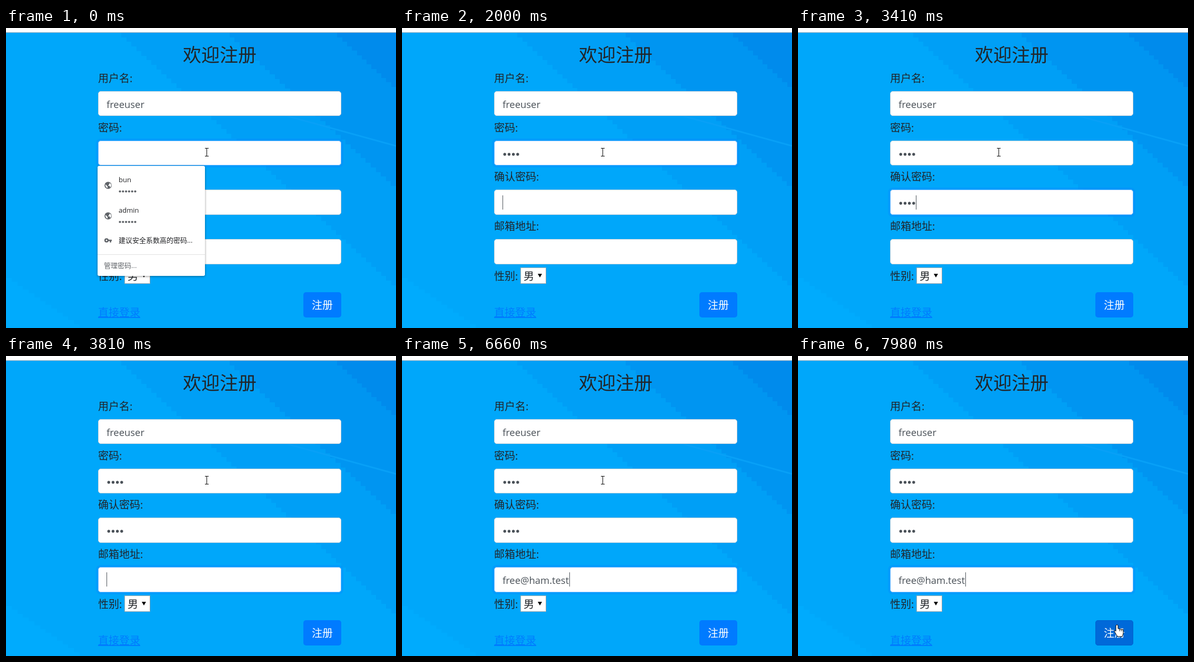
These frames come from a looping animation (741x570 px, 8 s). An HTML page:

```html
<!DOCTYPE html>
<html lang="zh-CN">
<head>
<meta charset="utf-8">
<title>注册</title>
<style>
  html, body { margin: 0; width: 100%; height: 100%; overflow: hidden; background: #fff; }
  svg { display: block; width: 741px; height: 570px; }
  text { font: 20px "Open Sans", "Noto Sans CJK SC", "Noto Sans CJK", sans-serif; fill: #212529; }
  .title { font-size: 35px; }
  .value { font-size: 18.4px; fill: #495057; }
  .small { font-size: 13px; fill: #202124; }
  .gray { fill: #5f6368; }
  .dot { fill: #495057; }
  .field { fill: #fff; stroke: #ced4da; }
  .glow { stroke: #007bff; stroke-opacity: .25; stroke-width: 4; }
  .link { fill: #007bff; text-decoration: underline; }
  .white { fill: #fff; }
  #popup { filter: drop-shadow(0 1px 2px rgba(0, 0, 0, .4)); }
</style>
</head>
<body>
<svg viewBox="0 0 741 570">
  <rect y="9" width="741" height="561" fill="#00a7fa"/>
  <g id="sky" shape-rendering="crispEdges"></g>
  <path d="M530 166L741 224" stroke="#08a0f7" stroke-width="3"/>
  <path d="M0 8.500H741" stroke="#a9b4bd"/>

  <text class="title" x="336" y="64">欢迎注册</text>
  <g id="form"></g>
  <rect id="caret" width="1" height="27" fill="#495057"/>

  <text x="175" y="479">性别:</text>
  <rect x="225.5" y="455.5" width="48" height="30" fill="#fff" stroke="#a9a9a9"/>
  <text x="231" y="479">男</text>
  <path d="M258 467H266L262 474Z"/>
  <text class="link" x="175" y="548">直接登录</text>
  <rect x="565" y="502" width="72" height="48" rx="5" fill="#007bff"/>
  <rect id="hover" x="565.5" y="502.5" width="71" height="47" rx="4.5" fill="#0069d9" stroke="#0062cc"/>
  <text class="white" x="581" y="534">注册</text>

  <g id="popup">
    <rect class="white" x="174" y="262" width="204" height="209" rx="3"/>
    <g id="saved"></g>
    <g fill="none" stroke="#5f6368" stroke-width="2.6">
      <circle cx="191" cy="403.500" r="2.8"/>
      <path d="M194 403.500H201M198.500 403.500V407.500"/>
    </g>
    <text class="small" x="214" y="408">建议安全系数高的密码...</text>
    <path d="M174 430.500H378" stroke="#e0e0e0"/>
    <text class="small gray" x="186" y="456">管理密码...</text>
  </g>

  <g id="cursor" stroke="#000" fill="#fff" stroke-linejoin="round">
    <path fill="none" d="M-3 -7.500H4M.5 -7.500V7.500M-3 7.500H4"/>
    <path d="M0 0V17L4 13L7 19L9.500 18L7 12H12Z"/>
    <path d="M-2 1Q0 -2 2 1V7L12 9V16L10 22H1L-5 12Q-5 9 -2 12ZM5.500 8V12M9 9V12"/>
  </g>
</svg>
<script>
const $ = id => document.getElementById(id);
const NS = 'http://www.w3.org/2000/svg';
const LOOP = 8000, MAIL = 'free@ham.test', FADE = 150, BLINK = 550;

function add(parent, tag, attrs, text = '') {
  const el = parent.appendChild(document.createElementNS(NS, tag));
  for (const k in attrs) el.setAttribute(k, attrs[k]);
  el.textContent = text;
  return el;
}

// Diagonal edge in small stairs, closed by the corner (cx, cy)
function band(fill, x, y, u, v, cx, cy) {
  const n = Math.round(Math.hypot(u - x, v - y) / 13);
  let d = `M${x} ${y}`;
  for (let k = 1; k <= n; k++)
    d += `H${Math.round(x + (u - x) * k / n)}V${Math.round(y + (v - y) * k / n)}`;
  add($('sky'), 'path', { d: `${d}L${cx} ${cy}Z`, fill });
}
band('#00abfd', 0, 475, 140, 570, 0, 570);
for (let i = 0; i < 3; i++) {
  const x = 210 + 205 * i;
  band(`rgb(0,${159 - 10 * i},${246 - 5 * i})`, x, 9, 741, 9 + (741 - x) * .92, 741, 9);
}

// Form rows share one pitch
const rowY = (i, offset) => Math.round(120 + 93.7 * i + offset);
const rows = ['用户名:', '密码:', '确认密码:', '邮箱地址:'].map((label, i) => {
  const top = rowY(i, 0), bottom = rowY(i, 47.45), form = $('form');
  const box = { x: 175.5, y: top + .5, width: 461, height: bottom - top - 1, rx: 4.5 };
  add(form, 'text', { x: 175, y: top - 17 }, label);
  add(form, 'rect', { class: 'field', ...box });
  const glow = add(form, 'g', { fill: 'none' });
  add(glow, 'rect', { class: 'glow', x: 173, y: top - 2, width: 466, height: bottom - top + 4, rx: 7 });
  add(glow, 'rect', { stroke: '#80bdff', ...box });
  const value = add(form, 'text', { class: 'value', x: 191, y: rowY(i, 32) });
  return { top, bottom, glow, value };
});
rows[0].value.textContent = 'freeuser';
const mail = rows[3].value;

function dots(parent, count, x, y, gap, r, cls) {
  return Array.from({ length: count }, (_, i) =>
    add(parent, 'circle', { class: cls, cx: x + gap * i, cy: y, r }));
}
const secrets = [1, 2].map(i => dots($('form'), 4, 195.2, rowY(i, 26), 8.2, 2.7, 'dot'));

['bun', 'admin'].forEach((name, i) => {
  const y = 299 + 58 * i, g = $('saved');
  add(g, 'circle', { class: 'gray', cx: 194, cy: y, r: 6.8 });
  add(g, 'path', { class: 'white', d: `M189 ${y - 2}l4 4v3q-4-1-4-5ZM194 ${y - 5}l3 1-3 5h3l1 3q4-4 0-8Z` });
  add(g, 'text', { class: 'small', x: 214, y: y - 6 }, name);
  dots(g, 6, 216.5, y + 11.5, 5.8, 2.1, 'gray');
});

// Steady typing into each field after it takes the focus
const entries = [
  { focus: -2 * BLINK + 350, first: 900, gap: 260, length: 4 },
  { focus: 2000, first: 2620, gap: 263, length: 4 },
  { focus: 3640, first: 4340, gap: 193, length: MAIL.length }
];
const clamp = v => Math.min(1, Math.max(0, v));
const show = (el, on) => el.style.display = on ? '' : 'none';
const typedAt = (e, t) => t < e.first ? 0 : Math.min(e.length, Math.floor((t - e.first) / e.gap) + 1);

function draw(t) {
  const typed = entries.map(e => typedAt(e, t));
  const active = entries.filter(e => e.focus <= t).length - 1;
  const entry = entries[active], count = typed[active];

  entries.forEach((e, i) => {
    const next = entries[i + 1];
    const fadeIn = clamp((t - e.focus) / FADE);
    rows[i + 1].glow.style.opacity = fadeIn - (next ? clamp((t - next.focus) / FADE) : 0);
  });
  rows[0].glow.style.opacity = 0;
  secrets.forEach((row, i) => row.forEach((dot, j) => show(dot, j < typed[i])));
  mail.textContent = MAIL.slice(0, typed[2]);
  show($('popup'), t < entries[1].focus);

  // The caret blinks from the last key or focus change
  const last = count ? entry.first + entry.gap * (count - 1) : entry.focus;
  const width = active < 2 ? Math.round(8.2 * count) : count && Math.ceil(mail.getComputedTextLength());
  $('caret').setAttribute('x', 191 + width);
  $('caret').setAttribute('y', rowY(active + 1, 10.3));
  show($('caret'), (t - last) % (2 * BLINK) < BLINK);

  // The pointer moves in seven quick steps, slowing down
  const step = t < 7530 ? 0 : Math.min(7, Math.floor((t - 7530) / 75) + 1);
  const ease = 1 - (1 - step / 7) ** 3;
  const x = Math.round(381 + 225 * ease), y = Math.round(236 + 275 * ease);
  const shape = y > 502 ? 2 : rows.some(r => y >= r.top && y < r.bottom) ? 0 : 1;
  $('cursor').setAttribute('transform', `translate(${x} ${y})`);
  [...$('cursor').children].forEach((c, i) => show(c, i === shape));
  $('hover').style.opacity = clamp((t - 7830) / FADE);
}

let start;
function tick(now) {
  start ??= now;
  draw((now - start) % LOOP);
  requestAnimationFrame(tick);
}
draw(0);
requestAnimationFrame(tick);
</script>
</body>
</html>
```
